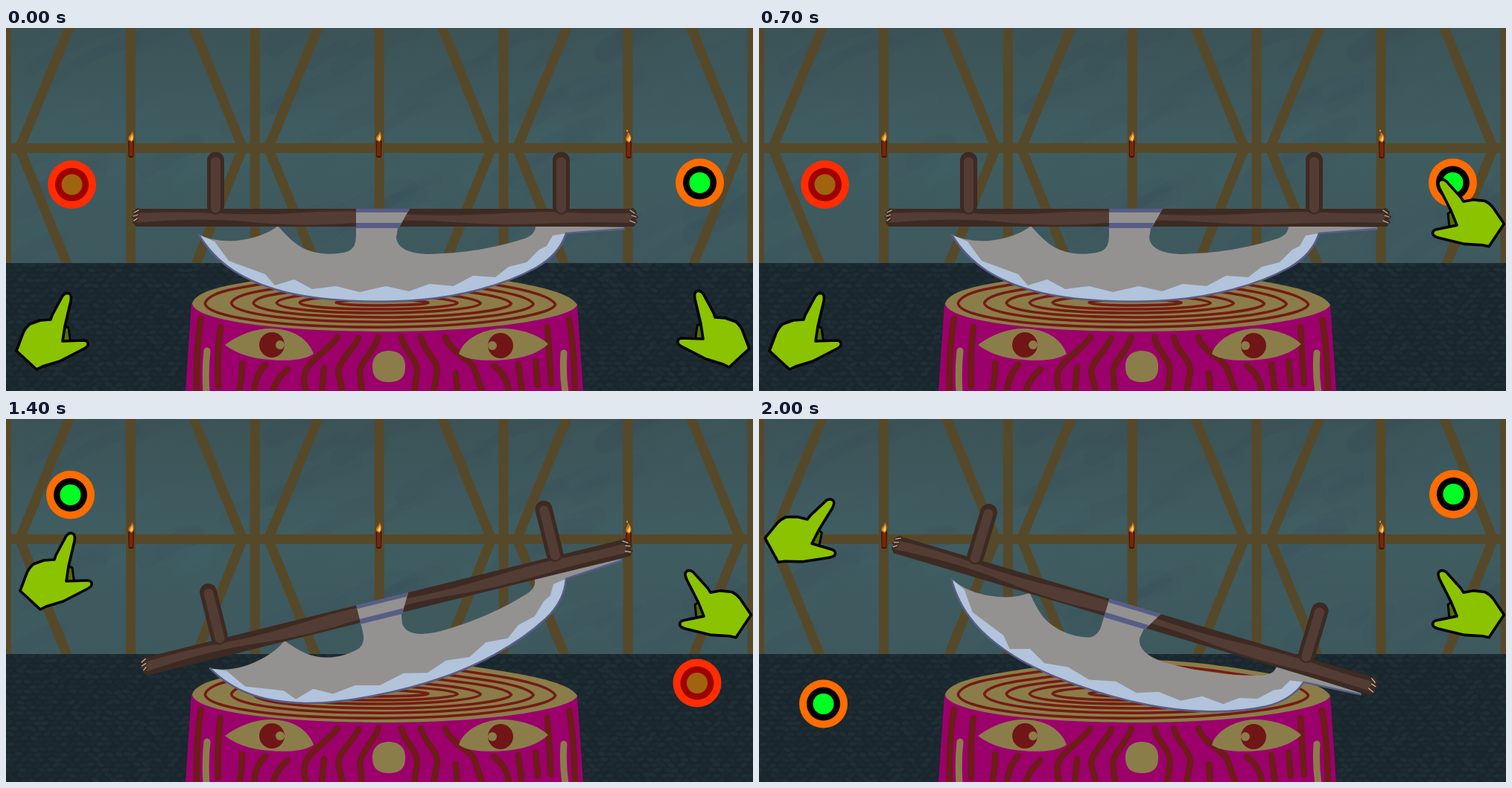
An HTML page with a canvas that plays this animation: 1003 px wide and 488 px high, repeating every 2.1 s.

```html
<!DOCTYPE html>
<html lang="en">
<head>
<meta charset="utf-8">
<title>Rocking blade</title>
<style>
html, body { margin: 0; width: 100%; height: 100%; overflow: hidden; background: #1c2931; }
canvas { display: block; }
</style>
</head>
<body>
<canvas width="1003" height="488"></canvas>
<script>
const W = 1003, H = 488, LOOP = 2100, STEP = 100;
const canvas = document.querySelector('canvas');
const stage = canvas.getContext('2d');
const scenery = document.createElement('canvas');
scenery.width = W;
scenery.height = H;
let ctx = scenery.getContext('2d');

let seed = 7;
function random() {
  seed = (seed * 16807) % 2147483647;
  return seed / 2147483647;
}

function fill(path, color) {
  ctx.fillStyle = color;
  ctx.fill(new Path2D(path));
}

function line(path, color, width, cap = 'round') {
  ctx.strokeStyle = color;
  ctx.lineWidth = width;
  ctx.lineCap = cap;
  ctx.lineJoin = 'round';
  ctx.stroke(new Path2D(path));
}

function ellipse(x, y, rx, ry, color, tilt = 0) {
  ctx.fillStyle = color;
  ctx.beginPath();
  ctx.ellipse(x, y, rx, ry, tilt, 0, 7);
  ctx.fill();
}

function rect(x, y, w, h, color) {
  ctx.fillStyle = color;
  ctx.fillRect(x, y, w, h);
}

function drawWall() {
  const shade = ctx.createLinearGradient(0, 0, 0, 316);
  shade.addColorStop(0, '#3b5357');
  shade.addColorStop(0.45, '#3f5c60');
  shade.addColorStop(1, '#3d595e');
  rect(0, 0, W, 316, shade);

  // Faint diagonal brush marks
  for (let i = 0; i < 90; i++) {
    const x = random() * W, y = random() * 316, length = 40 + random() * 90;
    const tone = random() < 0.5 ? 'rgba(80,120,120,.03)' : 'rgba(35,50,58,.03)';
    line(`M${x} ${y}q${length / 2} ${-length * 0.4} ${length} ${-length * 0.5}`, tone, 12 + random() * 22);
  }

  const wood = '#564929';
  for (const x of [0, 334, 668]) {
    line(`M${x + 86.5} -4L${x + 20} 157M${x + 250.5} -4L${x + 316} 157
      M${x + 20} 166L${x + 83} 320M${x + 316} 166L${x + 254} 320`, wood, 13, 'butt');
  }
  for (let i = 0; i < 7; i++) rect(-6 + i * 166.9, 0, 13, 316, wood);
  rect(0, 155, W, 13, wood);
}

function drawFloor() {
  ctx.save();
  ctx.beginPath();
  ctx.rect(0, 316, W, 172);
  ctx.clip();
  rect(0, 316, W, 172, '#1a262d');
  for (let y = 318, row = 0; y < H + 6; y += 7, row++) {
    for (let x = row % 2 * 6; x < W + 8; x += 12) {
      const stone = ['#1c2931', '#1d2b33', '#1f2d35'][random() * 3 | 0];
      ellipse(x + random() * 4 - 2, y + random() * 2 - 1, 5.4, 2.9, stone, random() - 0.5);
    }
  }
  ctx.restore();
}

function drawCandle(x, y, lean) {
  ctx.save();
  ctx.translate(x, y);
  fill('M-4 1Q0 -1 4 1L3.5 22Q0 25 -3.5 22Z', '#431507');
  fill('M-2.5 2H2.5V21H-2.5Z', '#7b260d');
  fill(`M-3.5 -2C-4 -6 ${1 + lean} -7 ${1 + lean} -12C5 -7 4 -2 1 2Q-2 2 -3.5 -2Z`, '#cf7417');
  fill('M-2 -2Q1 -5 1 -8Q4 -3 1 1Z', '#f8c569');
  if (lean) ellipse(-2, -14, 1, 1.5, '#e9a524');
  ctx.restore();
}

function drawEye(outline, irisX, irisY, glintX) {
  fill(outline, '#8b7d49');
  ellipse(irisX, irisY, 17, 17, '#701616');
  ellipse(glintX, irisY, 6, 6, '#8b7d49');
}

function drawStump() {
  const tan = '#8b7d49', bark = '#6e1b19';
  fill('M249 370L241 488H775L767 372Z', '#9b006b');
  line(`M262 391Q255 430 256 488M288 402Q283 440 285 482
    M317 451Q318 462 313 490M348 453Q334 468 333 490M378 459Q362 472 358 490
    M445 416C432 434 408 446 402 462Q398 474 404 490M427 457L424 490
    M473 417C466 434 448 446 446 462L452 490
    M500 416C494 434 478 446 475 462L478 490
    M531 416C535 435 552 444 552 462L548 490
    M557 416C562 436 580 446 579 462L574 490
    M590 416C596 434 618 442 628 456L640 490
    M604 464L606 490M655 454Q674 468 675 490M688 452L693 490M711 448L714 480
    M727 402L732 478M756 392Q763 430 764 488`, bark, 8.5);
  line('M270 434Q267 460 269 490M749 437Q747 462 751 490', tan, 9);

  // The rings repeat the outline of the top, scaled about its centre.
  const top = new Path2D('M-258 1C-252 -17 -208 -24 -163 -31C-108 -40 -48 -45 0 -45' +
    'C52 -46 112 -38 152 -31C212 -22 252 -11 259 3C254 21 142 39 0 39C-138 39 -256 25 -258 1Z');
  const scaledTop = (x, sx, sy) => {
    const path = new Path2D();
    path.addPath(top, new DOMMatrix([sx, 0, 0, sy, x, 369]));
    return path;
  };
  ctx.fillStyle = tan;
  ctx.fill(scaledTop(508, 1, 1));
  ctx.strokeStyle = '#751b13';
  ctx.lineWidth = 3.5;
  [[502, 0.91, 0.85], [505, 0.785, 0.67], [505, 0.67, 0.51], [500, 0.53, 0.36], [500, 0.41, 0.23], [505, 0.24, 0.1]]
    .forEach(ring => ctx.stroke(scaledTop(...ring)));

  drawEye('M294 426C312 412 335 404 355 404C385 404 406 418 413 438C400 447 375 448 355 446C325 444 308 436 294 426Z', 357, 426, 368);
  drawEye('M608 438C614 418 640 405 665 404C690 404 715 412 728 425C715 437 695 444 670 446C645 448 620 447 608 438Z', 664, 427, 653);
  fill('M514 434C529 434 537 443 536 456C536 469 530 476 514 476C498 476 492 468 492 455C492 443 499 434 514 434Z', tan);
}

function drawBlade({ angle, x, y }) {
  const dark = '#3d2a23', brown = '#533c33', steel = '#949290', edge = '#585d88';
  ctx.save();
  ctx.translate(x, y);
  ctx.rotate(angle * Math.PI / 180);
  ctx.translate(-508, -255);

  const curve = 'C745 298 728 313 712 322C665 348 605 361 560 365C500 371 420 367 371 354C320 340 283 318 259 278';
  fill('M259 278Q281 288 309 286Q345 282 365 266Q377 280 388 289C408 305 439 307 460 300Q470 295 470 280V262H527L524 282' +
    'Q526 302 565 304C615 303 655 296 693 284Q711 279 711 266L830 268V271L752 276' + curve + 'Z', steel);
  fill('M752 276' + curve + 'L280 287L299 313L348 331L361 346L387 338L411 351L443 347L475 355L510 347L541 354' +
    'L569 344L601 347L627 333L657 335L675 321L699 315L716 298L726 293L734 279Z', '#b2c3dc');
  line('M830 270L752 276' + curve, edge, 2.5);

  rect(174, 243, 670, 24, dark);
  fill('M172 249Q230 246 284 249T400 248T520 249T650 250T760 248T846 249V262Q780 260 720 263T600 261T470 262T330 261T172 262Z', brown);
  fill('M470 243H542L530 264L527 269H470Z', steel);
  fill('M470 243H542L539 248H470ZM470 262H531L527 269H470Z', edge);

  for (const peg of [281.5, 745.5]) {
    line(`M${peg} 178V239`, dark, 23);
    line(`M${peg} 180V242`, brown, 13);
  }
  line('M177 244L172 248L177 251L171 254L176 257L172 261L175 264M841 244L845 248L840 251L847 254L841 257L846 261L841 265', dark, 4);
  line('M178 245L172 248M177 251L171 253M176 256L172 259M838 245L844 249M840 252L846 254M838 259L845 262', '#c6b89a', 1.3);
  ctx.restore();
}

function drawTarget(x, y, lit) {
  const colors = lit ? ['#ff6c00', '#000', '#00ff22'] : ['#ff2d00', '#9d0000', '#a0640e'];
  [32.5, 22.5, 14].forEach((r, i) => ellipse(x, y, r, r, colors[i]));
}

// The origin is the thumb tip; the right hand is the mirror image.
function drawHand({ x, y, angle }, mirrored) {
  ctx.save();
  ctx.translate(x, y);
  ctx.rotate(angle * Math.PI / 180);
  if (mirrored) ctx.scale(-1, 1);
  const palm = 'M-34 -65Q-29 -71 -24 -67Q-22 -65 -23 -58L-31 -24L-34 -4L-5 -5Q1 -4 0 1Q-1 4 -7 7L-38 23' +
    'L-61 30L-69 34L-96 9L-87 -15Q-84 -22 -78 -27L-64 -32L-50 -33L-48 -39Z';
  fill('M-31 -24L-24 -22L-24 -7L-34 -3L-38 -12Z', '#537300');
  line('M-31 -24L-26 -22L-24 -7', '#000', 3);
  fill(palm, '#8bc300');
  line(palm, '#000', 3.6);
  ctx.restore();
}

// Each key is [time, ...values]; values move linearly between keys.
function track(keys, t) {
  let i = 0;
  while (i < keys.length - 1 && keys[i + 1][0] <= t) i++;
  const a = keys[i], b = keys[i + 1] || a;
  const k = a === b ? 0 : (t - a[0]) / (b[0] - a[0]);
  const [x, y, angle] = a.slice(1).map((v, n) => v + (b[n + 1] - v) * k);
  return { x, y, angle };
}

const bladeKeys = [
  [0, 508, 255, 0], [700, 508, 255, 0], [900, 510, 253, -13.9],
  [1700, 510, 253, -13.9], [1800, 509, 257, -5.4], [2000, 503.5, 264, 16.6]
];
const rightHandKeys = [
  [0, 902, 422, 0], [400, 897, 322, 0], [600, 894.5, 273, 0], [700, 905, 277, -13.6]
];
const leftHandKeys = [
  [0, 110, 425, 0], [900, 110, 425, 0], [1400, 115, 222, 0],
  [1500, 116, 182, 0], [1700, 102, 182, 18.4]
];

function drawTargets(t) {
  if (t < 800) {
    drawTarget(88.5, 210.5, false);
    drawTarget(931.5, 208, true);
  } else if (t < 1800) {
    drawTarget(86.5, 102, true);
    drawTarget(928, 355, false);
  } else {
    drawTarget(86.5, 383, true);
    drawTarget(932.5, 101, true);
  }
}

function render(now) {
  const t = Math.floor(now % LOOP / STEP) * STEP;
  ctx.drawImage(scenery, 0, 0);
  drawBlade(track(bladeKeys, t));
  drawTargets(t);
  drawHand(track(leftHandKeys, t), false);
  drawHand(track(rightHandKeys, t), true);
  requestAnimationFrame(animate);
}

let start;
function animate(now) {
  start ??= now;
  render(now - start);
}

drawWall();
drawFloor();
drawCandle(168, 151, 0);
drawCandle(500.5, 151, 0);
drawCandle(836, 152, -2);
drawStump();
ctx = stage;
render(0);
</script>
</body>
</html>
```
